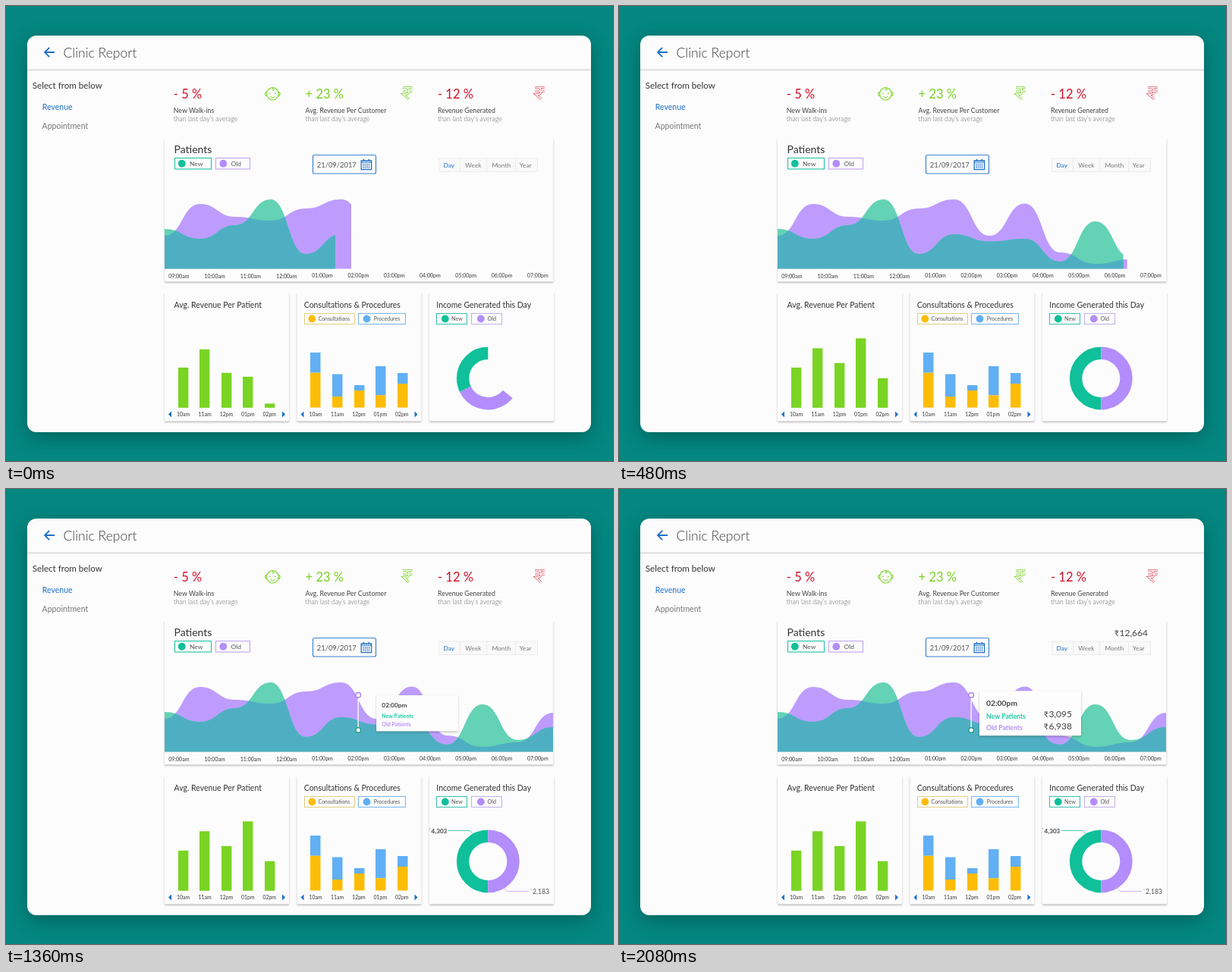
An HTML page with a canvas that plays this animation: 800x600 px, repeating every 2.92 s.

```html
<!DOCTYPE html>
<html lang="en">
<head>
<meta charset="utf-8">
<title>Clinic Report</title>
<style>
html, body { margin: 0; width: 100%; height: 100%; overflow: hidden; background: #048781; }
canvas { display: block; width: 800px; height: 600px; }
</style>
</head>
<body>
<canvas id="stage" width="800" height="600"></canvas>
<script>
const ctx = document.getElementById('stage').getContext('2d');
const LOOP = 2920, STEP = 40;
const TEAL = '#0fc09a', PURPLE = '#b38dfb', GREEN = '#7ad423', RED = '#d0112b',
  BLUE = '#1d70c9', YELLOW = '#fdbc05', SKY = '#61aff4', PAPER = '#fcfcfc', INK = '#3a3a3a';

const clamp = v => Math.max(0, Math.min(1, v));
const sine = u => (1 - Math.cos(Math.PI * clamp(u))) / 2;
const ramp = (t, from, to) => clamp((t - from) / (to - from));

function text(str, x, y, size, color = INK, weight = 400, align = 'left') {
  ctx.font = `${weight} ${size}px Lato, "Open Sans", sans-serif`;
  ctx.textAlign = align;
  ctx.fillStyle = color;
  ctx.fillText(str, x, y);
}

function rect(x, y, w, h, color) {
  ctx.fillStyle = color;
  ctx.fillRect(x, y, w, h);
}

function dot(x, y, r, color) {
  ctx.fillStyle = color;
  ctx.beginPath();
  ctx.arc(x, y, r, 0, Math.PI * 2);
  ctx.fill();
}

function stroke(path, color, width) {
  ctx.strokeStyle = color;
  ctx.lineWidth = width;
  ctx.stroke(new Path2D(path));
}

function raised(x, y, w, h, r, color, shadow, blur, drop) {
  ctx.save();
  ctx.shadowColor = shadow;
  ctx.shadowBlur = blur;
  ctx.shadowOffsetY = drop;
  ctx.fillStyle = color;
  ctx.beginPath();
  ctx.roundRect(x, y, w, h, r);
  ctx.fill();
  ctx.restore();
}

// A card whose shadow shows only at the sides and below.
function panel(x, y, w, h) {
  ctx.save();
  ctx.beginPath();
  ctx.rect(x - 5, y, w + 10, h + 8);
  ctx.clip();
  raised(x, y, w, h, 1, PAPER, 'rgba(0,0,0,.26)', 2.4, 1.4);
  ctx.restore();
}

function chip(x, y, w, h, border, color, label, dotX, textX, size) {
  ctx.strokeStyle = border;
  ctx.lineWidth = 1.1;
  ctx.strokeRect(x + .5, y + .5, w - 1, h - 1);
  dot(dotX, y + h / 2, 4.9, color);
  text(label, textX, y + h / 2 + size * .36, size, '#555');
}

// Knots evenly spaced over the chart, joined by curves that are flat at each knot.
const CHART = { x: 209, w: 512, base: 346.5 };
const oldY = [303, 261, 278, 283, 267, 255, 303, 260.5, 325, 340, 334, 295];
const newY = [294, 307, 289, 255, 327, 301, 310.5, 307, 337, 284, 331, 314];

function area(ys) {
  const p = new Path2D(), dx = CHART.w / (ys.length - 1);
  p.moveTo(CHART.x, CHART.base);
  p.lineTo(CHART.x, ys[0]);
  for (let i = 1; i < ys.length; i++) {
    const x = CHART.x + i * dx, mid = x - dx / 2;
    p.bezierCurveTo(mid, ys[i - 1], mid, ys[i], x, ys[i]);
  }
  p.lineTo(CHART.x + CHART.w, CHART.base);
  p.closePath();
  return p;
}
const oldArea = area(oldY), newArea = area(newY);

function clipTo(right) {
  ctx.beginPath();
  ctx.rect(CHART.x, 240, Math.min(CHART.w, right), 120);
  ctx.clip();
}

function drawAreas(t) {
  const oldW = 549 * sine(.467 + t / 1776);
  const newW = 549 * sine(.4424 + t / 1672);
  ctx.save();
  clipTo(oldW);
  ctx.fillStyle = '#bd9cfd';
  ctx.fill(oldArea);
  ctx.restore();
  ctx.save();
  clipTo(newW);
  ctx.fillStyle = '#63d2b5';
  ctx.fill(newArea);
  ctx.clip(newArea);
  clipTo(oldW);
  ctx.fillStyle = '#4fafc2';
  ctx.fill(oldArea);
  ctx.restore();
}

function ringDot(y, size, color) {
  dot(464.2, y, 4 * size, color);
  dot(464.2, y, 2.5 * size, '#fff');
}

function drawMarker(t) {
  const grow = sine(ramp(t, 700, 990));
  if (grow > 0) {
    ctx.strokeStyle = '#fff';
    ctx.lineWidth = 1.3;
    ctx.beginPath();
    ctx.moveTo(464.2, 318);
    ctx.lineTo(464.2, 318 - 46 * grow);
    ctx.stroke();
  }
  ringDot(318, sine(ramp(t, 640, 840)), '#2a9c8e');
  ringDot(271.8, sine(ramp(t, 940, 1140)), '#ab84f4');
}

function drawTooltip(t) {
  const u = ramp(t, 1028, 1623), s = 1 - (1 - u) ** 2;
  if (!s) return;
  ctx.save();
  ctx.globalAlpha = ramp(t, 1040, 1180);
  ctx.translate(542, 296);
  ctx.scale(s, s);
  ctx.translate(-542, -296);
  raised(475, 266.3, 134, 59, 1, '#fdfdfd', 'rgba(0,0,0,.26)', 3 * s, 1.5 * s);
  text('02:00pm', 484, 286, 10.3, '#444', 700);
  text('New Patients', 484, 303, 8.7, '#1fcaa2', 700);
  text('Old Patients', 484, 317.6, 8.7, '#b590f8', 700);
  ctx.restore();
}

function amount(str, right, y) {
  text(str, right, y, 12, '#444', 400, 'right');
  const w = ctx.measureText(str).width;
  text('₹', right - w - .6, y, 10.5, '#444', 400, 'right');
}

function drawAmounts(t) {
  ctx.globalAlpha = sine(ramp(t, 1690, 2080));
  amount('3,095', 597, 301.3);
  amount('6,938', 597, 316.6);
  amount('12,664', 697, 194);
  ctx.globalAlpha = 1;
}

function drawDonut(t) {
  const p = sine(.592 + t / 970), top = -Math.PI / 2;
  const ring = (from, to, color) => {
    ctx.strokeStyle = color;
    ctx.lineWidth = 16.4;
    ctx.beginPath();
    ctx.arc(635.3, 491, 33.2, top - from, top - to, true);
    ctx.stroke();
  };
  ring(0, Math.PI * p, TEAL);
  ring(Math.PI * p, 2 * Math.PI * p, PURPLE);

  ctx.globalAlpha = sine(ramp(t, 620, 1190));
  stroke('M583 450.5 H611 L616 455', '#4fcdb2', 1);
  stroke('M655 525 L660.5 530.5 H689', '#cdb8f5', 1);
  text('4,303', 560.6, 453.6, 8.1, '#444', 700);
  text('2,183', 694, 534.3, 8.6, '#555');
  rect(558, 447, 1, 1.6, '#999');
  rect(691.6, 527.5, 1, 1.6, '#999');
  ctx.globalAlpha = 1;
}

const HOURS = ['10am', '11am', '12pm', '01pm', '02pm'];

function drawAxis(left) {
  HOURS.forEach((h, i) => text(h, left + 24.6 + i * 28.4, 541.4, 6.9, INK, 400, 'center'));
  ctx.fillStyle = BLUE;
  ctx.fill(new Path2D(`M${left + 5} 538.5 l4 -4 v8 z M${left + 159} 538.5 l-4 -4 v8 z`));
}

function drawRevenueBars(t) {
  [53, 78.5, 59, 91.5, 39].forEach((full, i) => {
    const h = full * sine((t + 612 - 120 * i) / 540);
    rect(Math.floor(227 + i * 28.5), 529.8 - h, 13.4, h, GREEN);
  });
}

function drawStackedBars() {
  const tops = [457, 485.5, 500, 475, 484], splits = [483.7, 515, 507, 513.3, 498];
  tops.forEach((y, i) => {
    const x = Math.round(401.3 + i * 28.65);
    rect(x, y, 13.5, splits[i] - y, SKY);
    rect(x, splits[i], 13.5, 529.5 - splits[i], YELLOW);
  });
}

function rupeeIcon(x, color) {
  ctx.save();
  ctx.translate(x, 106);
  const p = 'M.5 1.5 H13 M.5 6.3 H13 M4 1.5 C10 1.5 10 10.6 4 10.6 H1.5 L8.5 17';
  stroke(p, color, 3);
  stroke(p, PAPER, 1.5);
  ctx.restore();
}

function babyIcon() {
  stroke('M359.2 115.8 a7.8 8.2 0 1 1 -15.6 0 a7.8 8.2 0 1 1 15.6 0 Z', GREEN, 1.1);
  stroke('M343.6 113.4 c-2.6 0 -2.6 5 .3 5 M359.2 113.4 c2.6 0 2.6 5 -.3 5', GREEN, 1.1);
  stroke('M348 119 q3.4 3.4 6.8 0 M351.4 107.9 c2.6 .5 2.4 3.4 .4 3.2 c-1.2 -.2 -1 -1.6 0 -1.6', GREEN, 1);
  dot(348, 115.4, .8, GREEN);
  dot(354.8, 115.4, .8, GREEN);
}

function calendarIcon() {
  stroke('M468.2 204 H481.6 V215.6 H468.2 Z M471.5 201.8 v3 M478.3 201.8 v3', BLUE, 1.3);
  stroke('M468.2 206.2 H481.6', BLUE, 1);
  for (let r = 0; r < 3; r++)
    for (let c = 0; c < 4; c++) rect(470.3 + c * 2.5, 208 + r * 2.3, 1.5, 1.3, BLUE);
}

function drawHeader() {
  rect(0, 0, 800, 600, '#048781');
  raised(28, 39, 743, 523, 12, PAPER, 'rgba(0,0,0,.27)', 26, 7);
  rect(28, 83, 743, 1, '#e6e6e6');
  rect(28, 84, 743, 1, '#dedede');
  rect(28, 85, 743, 1, '#f2f2f2');
  stroke('M64 61 H51.4 M57.2 54.8 L51 61 L57.2 67.2', BLUE, 1.8);
  text('Clinic Report', 75.5, 68, 17.5, '#3c3c3c', 300);
  text('Select from below', 34.8, 109.3, 11.6, '#333');
  text('Revenue', 47.8, 137.2, 10.5, BLUE);
  text('Appointment', 47.6, 161.8, 10.5, '#777');
}

function drawStats() {
  const stats = [
    [220.8, '- 5 %', RED, 'New Walk-ins'],
    [394.6, '+ 23 %', '#79d021', 'Avg. Revenue Per Customer'],
    [569, '- 12 %', RED, 'Revenue Generated']
  ];
  for (const [x, value, color, label] of stats) {
    text(value, x, 121.8, 16.5, color);
    text(label, x, 141.3, 8.75, '#444');
    text('than last day’s average', x, 152.3, 8.75, '#666', 300);
  }
  babyIcon();
  rupeeIcon(522.5, GREEN);
  rupeeIcon(696.8, '#e0566a');
}

function drawPatients() {
  panel(209, 174, 512.5, 189.5);
  text('Patients', 221.5, 194, 14, '#333');
  chip(222, 200, 49, 15.5, '#22c5a2', TEAL, 'New', 231.8, 242, 8.4);
  chip(276, 200, 46, 15.5, '#c0a5f5', PURPLE, 'Old', 286.3, 296.6, 8.4);

  ctx.strokeStyle = '#3f84d3';
  ctx.lineWidth = 1.2;
  ctx.beginPath();
  ctx.roundRect(404.5, 196.5, 83, 24.5, 2);
  ctx.stroke();
  text('21/09/2017', 409.8, 212.8, 9.4, '#555');
  calendarIcon();

  rect(570, 200.5, 131, 18.5, '#f9f9f9');
  stroke('M570.5 201 H700.5 V218.5 H570.5 Z M598.5 201 V218.5 M633.5 201 V218.5 M671.5 201 V218.5', '#ececec', 1);
  text('Day', 576.5, 213, 8.4, BLUE);
  text('Week', 605.3, 213, 8.4, '#777');
  text('Month', 640.4, 213, 8.4, '#777');
  text('Year', 676.7, 213, 8.4, '#777');

  for (let i = 0; i < 11; i++) {
    const h = (i + 8) % 12 + 1, label = String(h).padStart(2, '0') + ':00' + (i < 4 ? 'am' : 'pm');
    text(label, 227.8 + i * 47.3, i < 4 ? 359.1 : 358.3, 7, INK, 400, 'center');
  }
}

function drawPanels() {
  for (const x of [209, 383.5, 558]) panel(x, 378, 164, 169.5);
  text('Avg. Revenue Per Patient', 221.6, 398.3, 10.45, '#333');
  text('Consultations & Procedures', 392.8, 398.3, 10.45, '#333');
  text('Income Generated this Day', 567.3, 398.3, 10.45, '#333');
  chip(393, 405, 67, 15, '#e2d089', YELLOW, 'Consultations', 403.3, 411.6, 6.9);
  chip(464, 405, 63, 15, '#7db9f0', SKY, 'Procedures', 475.5, 484.8, 7);
  chip(567, 405, 41, 15, '#3fc3b3', TEAL, 'New', 578.8, 587, 7.2);
  chip(613, 405, 41, 15, '#c3b4ec', PURPLE, 'Old', 625.8, 634.6, 7.2);
  drawAxis(209);
  drawAxis(383.5);
}

function draw(t) {
  drawHeader();
  drawStats();
  drawPatients();
  drawPanels();
  drawStackedBars();
  drawRevenueBars(t);
  drawDonut(t);
  drawAreas(t);
  drawMarker(t);
  drawTooltip(t);
  drawAmounts(t);
}

let start = null;
function tick(now) {
  if (start === null) start = now;
  const t = (now - start) % LOOP;
  draw(Math.floor(t / STEP) * STEP);
  requestAnimationFrame(tick);
}
draw(0);
requestAnimationFrame(tick);
</script>
</body>
</html>
```
